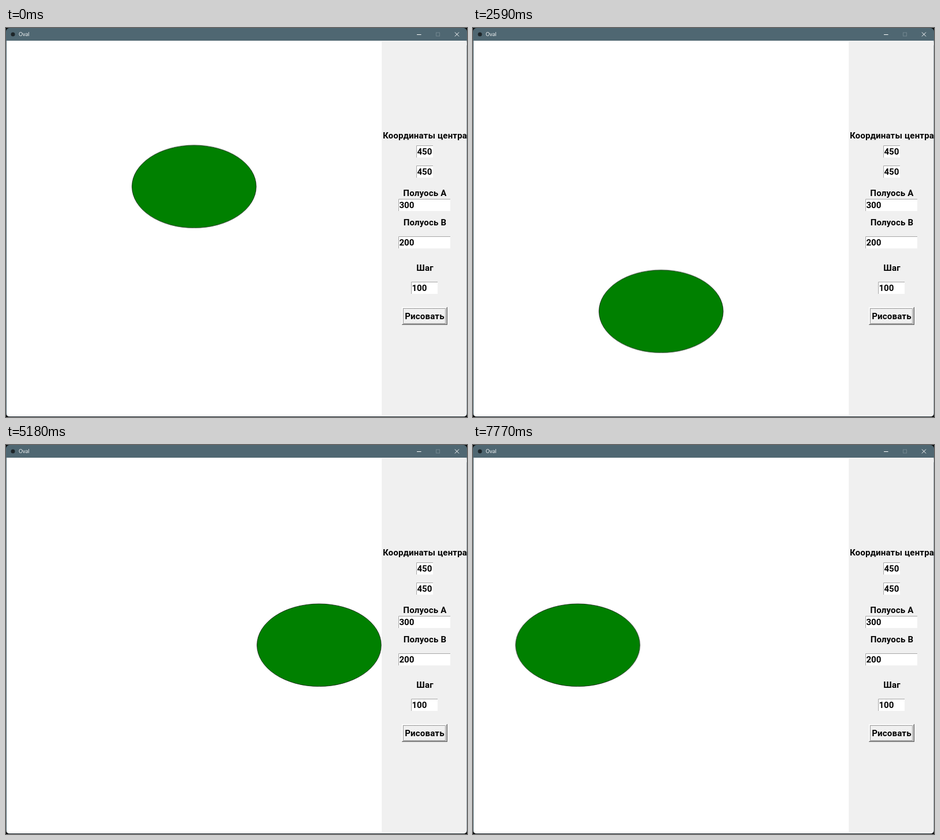
Animation, 800 px wide and 676 px high, one loop 8 s. Source, as an HTML page:

```html
<!DOCTYPE html>
<html lang="ru">
<head>
<meta charset="utf-8">
<title>Oval</title>
<style>
  html, body { margin: 0; width: 100%; height: 100%; overflow: hidden; background: #000; }
  svg { display: block; width: 800px; height: 676px; }
  text { font: 700 15px Roboto, sans-serif; fill: #000; }
  .caption { font: 400 9px "Open Sans", sans-serif; fill: #fff; }
  .label { text-anchor: middle; letter-spacing: .2px; }
  .field rect { fill: #fff; }
  .field path { fill: none; stroke: #a6a6a6; }

  /* One hop is 370 ms; the small negative delay keeps hops off rounding edges. */
  .oval { --hop: 72.3px; animation: wander 8000ms -1ms infinite; }
  @keyframes wander {
    0%       { transform: translate(0, calc(-1 * var(--hop))); animation-timing-function: steps(2); }
    9.25%    { transform: translate(0, calc(-3 * var(--hop))); animation-timing-function: steps(6); }
    37%      { transform: translate(0, calc(3 * var(--hop))); animation-timing-function: steps(3); }
    50.875%  { transform: translate(0, 0); animation-timing-function: steps(3); }
    64.75%   { transform: translate(calc(3 * var(--hop)), 0); animation-timing-function: steps(6); }
    92.5%    { transform: translate(calc(-3 * var(--hop)), 0); animation-timing-function: steps(1); }
    97.125%, 100% { transform: translate(calc(-2 * var(--hop)), 0); }
  }
</style>
</head>
<body>
<svg viewBox="0 0 800 676">
  <defs><clipPath id="window"><rect width="800" height="675.5" rx="6"/></clipPath></defs>
  <g clip-path="url(#window)">
    <rect width="800" height="676" fill="#4f6772"/>
    <rect x="1" y="22" width="798.5" height="653" rx="4" fill="#f0f0f0"/>
    <rect x="1" y="22" width="798.5" height="8" fill="#f0f0f0"/>
    <rect x="1.5" y="23.5" width="650.5" height="649" fill="#fff"/>

    <circle cx="12" cy="11" r="3.5" fill="#1d2529"/>
    <text class="caption" x="22" y="14.3">Oval</text>
    <g fill="none" stroke="#fff">
      <path d="M713 11.5h7.5"/>
      <rect x="746.5" y="8" width="6" height="6" stroke="#72868f"/>
      <path d="M779 7.5l7 7m0-7l-7 7"/>
    </g>

    <ellipse class="oval" cx="326.4" cy="347.8" rx="107.8" ry="71.8" fill="#008000" stroke="#000" stroke-width=".7"/>

    <g class="label">
      <text class="label" x="727" y="191.5">Координаты центра</text>
      <text class="label" x="727" y="292">Полуось A</text>
      <text class="label" x="727" y="342.5">Полуось B</text>
      <text class="label" x="727" y="422">Шаг</text>
    </g>
    <g id="fields"></g>

    <rect x="687" y="485" width="79" height="31" fill="#696969"/>
    <rect x="687" y="485" width="78" height="30" fill="#fff"/>
    <rect x="688" y="486" width="77" height="29" fill="#a0a0a0"/>
    <rect x="688" y="486" width="76" height="28" fill="#f0f0f0"/>
    <rect x="689.5" y="487.5" width="73" height="26" fill="none" stroke="#333" stroke-width=".8" stroke-dasharray="1.2 1"/>
    <text class="label" x="726.5" y="505.5">Рисовать</text>
  </g>
</svg>
<script>
  const field = (x, y, width, value) => `
    <g class="field" transform="translate(${x} ${y})">
      <rect width="${width}" height="21"/>
      <path d="M.5 21V.5H${width}"/>
      <text x="1.5" y="16.3">${value}</text>
    </g>`;
  document.getElementById('fields').innerHTML =
    field(712, 204, 29, 450) +
    field(712, 239, 29, 450) +
    field(681, 297, 90, 300) +
    field(681, 362, 90, 200) +
    field(703, 441, 46, 100);
</script>
</body>
</html>
```
